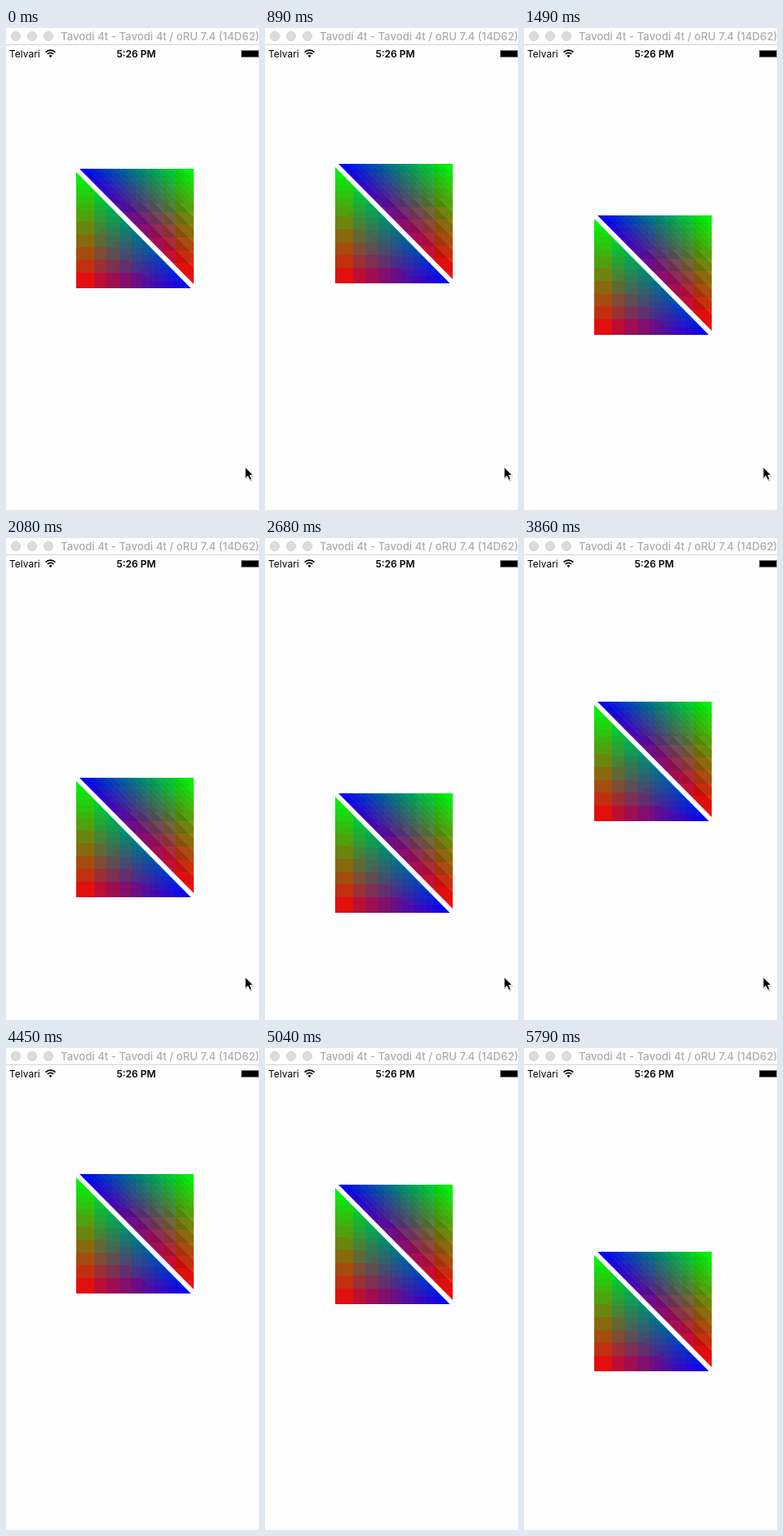
These frames come from a looping animation (310x589 px, 5890 ms). An HTML page with a canvas:

```html
<!DOCTYPE html>
<html lang="en">
<head>
<meta charset="utf-8">
<title>Triangles</title>
<style>
  html, body { margin: 0; width: 100%; height: 100%; overflow: hidden; background: #fefefe; }
  svg, canvas { position: absolute; left: 0; top: 0; display: block; }
  #quad { left: 86px; }
  text { font-family: Inter, Roboto, sans-serif; }
</style>
</head>
<body>
<canvas id="quad" width="144" height="146"></canvas>
<svg width="310" height="589" viewBox="0 0 310 589">
  <rect y="20" width="310" height="1" fill="#d4d4d4"/>
  <g fill="#dcdcdc" stroke="#d2d2d2">
    <circle cx="12" cy="10" r="5.5"/>
    <circle cx="32" cy="10" r="5.5"/>
    <circle cx="52" cy="10" r="5.5"/>
  </g>
  <text x="67" y="15" font-size="13.2" font-weight="500" fill="#acacac">Tavodi 4t - Tavodi 4t / oRU 7.4 (14D62)</text>
  <text x="4" y="35.5" font-size="12">Telvari</text>
  <text x="159.5" y="35.5" font-size="12" font-weight="600" text-anchor="middle">5:26 PM</text>
  <g fill="none" stroke="#000" stroke-width="1.7">
    <path d="M48.6 29.6a8.2 8.2 0 0 1 11.8 0M50.8 31.9a5.2 5.2 0 0 1 7.4 0"/>
    <path d="M54.5 36l-2-2.1a2.9 2.9 0 0 1 4 0z" fill="#000" stroke="none"/>
  </g>
  <rect x="288.5" y="27.5" width="21" height="8" fill="none" stroke="#777"/>
  <rect x="289" y="28" width="20" height="7"/>
  <g id="cursor" transform="translate(-.5 -1)">
    <path d="M294 539v14l3.2-3 2.6 5.2 3-1.3-2.5-5h4.4z" fill="#000" opacity=".25"/>
    <path d="M293.5 537.5v14l3.3-3 2.4 5 2.5-1.1-2.4-4.9h4.2z" stroke="#fff" stroke-width="1"/>
  </g>
</svg>
<script>
const W = 144, H = 146, LEG = 140;
const LOOP = 5890, STEPS = 40, CURSOR_STEPS = 29;
const SHORT = new Set([4, 12, 22, 24, 28, 32]); // steps held 140 ms instead of 150

const quad = document.getElementById('quad');
const cursor = document.getElementById('cursor');

const starts = [0];
for (let i = 0; i < STEPS - 1; i++) starts.push(starts[i] + (SHORT.has(i) ? 140 : 150));

// Reduce a 0..1 channel to n coarse levels
function level(value, n, shift = 0.4) {
  const bin = Math.max(0, Math.floor(value * n - shift));
  return Math.min(0.95, (bin ? bin + 0.5 + shift : 0.5) / n);
}

function triangle(ctx, points) {
  points.forEach(([x, y], i) => i ? ctx.lineTo(x, y) : ctx.moveTo(x, y));
  ctx.closePath();
}

// Barycentric colour, coarser in the red part and where blue fades out
function colorAt(x, y) {
  const upper = x > y;
  let r, g, b;
  if (upper) {
    const u = (x - 3.5) / LEG, v = (y + 0.5) / LEG;
    [r, g, b] = [v, u - v, 1 - u];
  } else {
    const u = (x + 0.5) / LEG, v = (y - 3.5) / (LEG + 2);
    [r, g, b] = [v - u, 1 - v, u];
  }
  const n = r > 0.3 ? 9 : 18;
  const green = level(g, n, 0.2);
  const blue = level(b, b > 0.5 ? 18 : 9);
  const red = upper ? level(r, n) : Math.max(0, Math.min(0.95, 1 - green - blue));
  return [red * 255, green * 255, blue * 255, 255];
}

function paintQuad() {
  const ctx = quad.getContext('2d');
  const image = ctx.createImageData(W, H);
  for (let y = 0; y < H; y++) {
    for (let x = 0; x < W; x++) image.data.set(colorAt(x, y), (y * W + x) * 4);
  }
  ctx.putImageData(image, 0, 0);
  ctx.globalCompositeOperation = 'destination-in';
  ctx.beginPath();
  triangle(ctx, [[4, 0], [W, 0], [W, 141]]);
  triangle(ctx, [[0, 4], [0, H], [LEG + 0.5, H]]);
  ctx.fill();
}

function topAt(ms) {
  return Math.round(232.3 - 81 * Math.cos(0.00152 * (ms - 486)));
}

function draw() {
  const t = performance.now() % LOOP;
  let step = STEPS - 1;
  while (starts[step] > t) step--;
  quad.style.transform = `translateY(${topAt(starts[step])}px)`;
  cursor.style.visibility = step < CURSOR_STEPS ? 'visible' : 'hidden';
  requestAnimationFrame(draw);
}

paintQuad();
draw();
</script>
</body>
</html>
```
